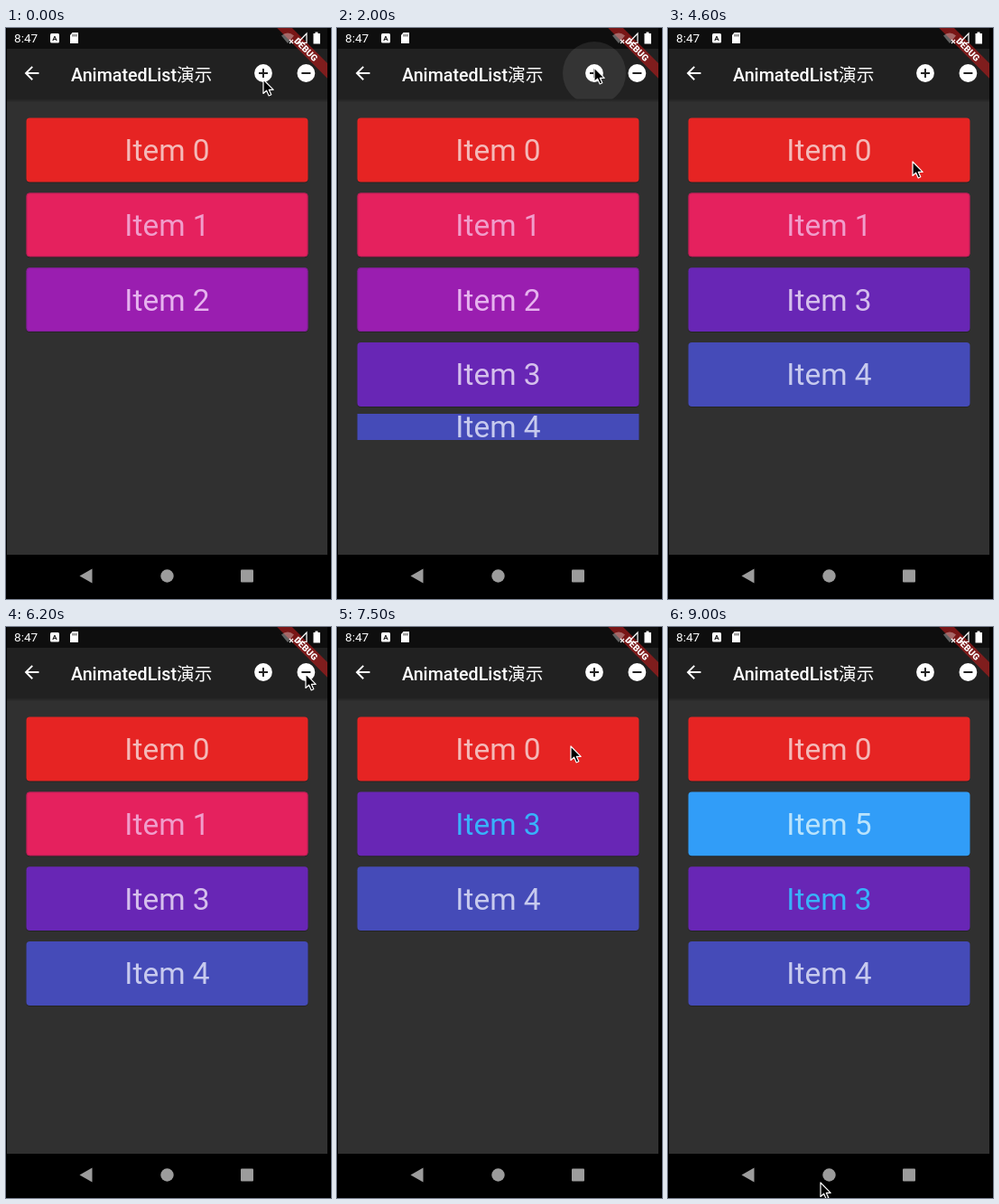
Recreate the animation shown at these times as an HTML page. Size 360 by 632 pixels, loop 9.1 s.

```html
<!DOCTYPE html>
<html lang="zh">
<head>
<meta charset="utf-8">
<title>List demo</title>
<style>
  html, body { margin: 0; width: 100%; height: 100%; overflow: hidden; background: #000; }
  svg { display: block; }
  text { font-family: Roboto, "Noto Sans CJK SC", "Noto Sans CJK", sans-serif; }
</style>
</head>
<body>
<svg id="stage" width="360" height="632" viewBox="0 0 360 632">
  <defs>
    <clipPath id="barClip"><rect x="1" y="0" width="355" height="78.5"/></clipPath>
    <clipPath id="screenClip"><rect x="1" y="0" width="355" height="632"/></clipPath>
    <linearGradient id="barShadow" x2="0" y2="1">
      <stop stop-color="#000" stop-opacity=".3"/>
      <stop offset="1" stop-color="#000" stop-opacity="0"/>
    </linearGradient>
  </defs>

  <rect width="360" height="632" fill="#000"/>
  <rect x="1" y="78" width="355" height="505" fill="#303030"/>
  <g id="list"></g>

  <rect x="1" y="0" width="355" height="78.5" fill="#212121"/>
  <rect x="1" y="78.5" width="355" height="4" fill="url(#barShadow)"/>
  <rect x="1" y="0" width="355" height="23" fill="#0e0e0e"/>
  <g id="splashes" clip-path="url(#barClip)" fill="#fff"></g>

  <path transform="translate(16.7 38.2) scale(.986)" fill="#fff"
    d="M20 11H7.83l5.59-5.59L12 4l-8 8 8 8 1.41-1.41L7.83 13H20z"/>
  <text x="72" y="58.5" font-size="19.7" font-weight="500" fill="#fff">AnimatedList演示</text>
  <g fill="#fff">
    <circle cx="285" cy="50" r="9.9"/>
    <circle cx="332.4" cy="50" r="9.9"/>
  </g>
  <path d="M280 50h10M285 45v10M327.4 50h10" stroke="#212121" stroke-width="2"/>

  <g clip-path="url(#screenClip)">
    <g transform="translate(356 0) rotate(45)">
      <rect x="-40" y="27.6" width="80" height="11.8" fill="#b71c1c" fill-opacity=".63"/>
      <text x="0" y="37.1" font-size="10" font-weight="900" fill="#fff" text-anchor="middle">DEBUG</text>
    </g>
  </g>

  <text x="9" y="16" font-size="13.6" fill="#fff">8:47</text>
  <rect x="49" y="6" width="10" height="10.5" rx="1.5" fill="#fff"/>
  <text x="54" y="14.2" font-size="8" font-weight="700" text-anchor="middle" fill="#111">A</text>
  <path d="M73.500 5H80V17H71V8Z" fill="#fff"/>
  <path d="M74 7v2.500M76 7v2.500M78 7v2.500" stroke="#111" stroke-width=".8"/>
  <path d="M305 8.500Q312 2.500 319 8.500L312 17Z" fill="#fff" fill-opacity=".35"/>
  <path d="M314 13l4 4M318 13l-4 4" stroke="#fff" stroke-width="1.200"/>
  <path d="M323 16.500H333V6Z" fill="none" stroke="#fff" stroke-width="1.200"/>
  <path d="M340.500 6H342.500V4.500H345.500V6H348V17.500H340.500Z" fill="#fff"/>

  <rect x="0" y="583" width="360" height="49" fill="#000"/>
  <g fill="#9c9c9c">
    <path d="M81.500 606.500L95.500 598.500V614.500Z"/>
    <circle cx="178.500" cy="606.500" r="7.200"/>
    <rect x="260" y="599.500" width="14" height="14" rx="1"/>
  </g>

  <path id="cursor" fill="#000" stroke="#fff" stroke-width="1.200" stroke-linejoin="round"
    d="M0 0V15.500L3.600 12.200L6.200 18L8.800 16.800L6.300 11.300H11.200Z"/>
</svg>
<script>
const LOOP = 9100, RESIZE = 300;
const LIST_TOP = 95.7, ROW = 78.9, PITCH = 82.8, MARGIN = 3.9;
const PLUS = 285, MINUS = 332.4;

// Listed in display order; times are in milliseconds.
const items = [
  { label: 0, fill: '#e62423', ink: '#f4b9b8' },
  { label: 1, fill: '#e5215e', ink: '#f09dcb', edge: '#a51c55', removed: 6300 },
  { label: 2, fill: '#9a1eb0', ink: '#e6b3ee', edge: '#74208c', selected: 2900, pick: '#409ffa', removed: 3950 },
  { label: 5, fill: '#319df8', ink: '#b9e3fc', added: 8060 },
  { label: 3, fill: '#6826b5', ink: '#d5bfec', added: 1250, selected: 7100, pick: '#38b2fa' },
  { label: 4, fill: '#454bb8', ink: '#c7caee', added: 1890 }
];

const taps = [[PLUS, 1250], [PLUS, 1890], [MINUS, 3950], [MINUS, 6300], [PLUS, 8060]];

// Pointer stops: time, x, y.
const pointer = [
  [0, 285, 57], [500, 285, 57], [1000, 285, 44], [2200, 285, 44],
  [2750, 262, 296], [3050, 262, 296], [3650, 336, 48], [4150, 336, 48],
  [4600, 271, 148], [4900, 264, 212], [5300, 264, 212], [5900, 332, 52],
  [6500, 332, 52], [6950, 256, 214], [7200, 256, 214], [7500, 259, 132],
  [7850, 285, 48], [8300, 285, 48], [9000, 169, 615], [9100, 169, 615]
];

const clamp = v => Math.max(0, Math.min(1, v));
const smooth = v => v * v * (3 - 2 * v);

function make(parent, tag, attrs) {
  const node = document.createElementNS('http://www.w3.org/2000/svg', tag);
  set(node, attrs);
  return parent.appendChild(node);
}

function set(node, attrs) {
  for (const key in attrs) node.setAttribute(key, attrs[key]);
}

const list = document.getElementById('list');
const cursor = document.getElementById('cursor');

for (const item of items) {
  item.row = make(list, 'svg', { x: 0, width: 356, overflow: 'hidden' });
  item.card = make(item.row, 'g', {});
  const box = { x: 22.5, width: 312, height: 70.9, rx: 4 };
  make(item.card, 'rect', { ...box, y: MARGIN + 1, fill: '#000', 'fill-opacity': .25 });
  make(item.card, 'rect', { ...box, y: MARGIN, fill: item.fill });
  if (item.edge) {
    make(item.card, 'rect', {
      x: 23, y: MARGIN + .5, width: 311, height: 69.9, rx: 3.5,
      fill: 'none', stroke: item.edge, 'stroke-opacity': .65
    });
  }
  item.text = make(item.card, 'text', {
    x: 178.5, y: MARGIN + 47.5, 'font-size': 33.5, 'text-anchor': 'middle'
  });
  item.text.textContent = 'Item ' + item.label;
}

const splashes = taps.map(([x, time]) => ({
  time, node: make(document.getElementById('splashes'), 'circle', { cx: x, cy: 50 })
}));

function extent({ added = -LOOP, removed = 2 * LOOP }, t) {
  return Math.min(clamp((t - added) / RESIZE), 1 - clamp((t - removed) / RESIZE));
}

function drawList(t) {
  let y = LIST_TOP;
  for (const item of items) {
    const size = extent(item, t);
    item.row.style.display = size > 0 ? '' : 'none';
    if (size <= 0) continue;
    const height = ROW * size;
    set(item.row, { y, height });
    set(item.card, { transform: `translate(0 ${(height - ROW) / 2})` });
    const picked = t >= item.selected && !(t >= item.removed);
    set(item.text, { fill: picked ? item.pick : item.ink });
    y += height + PITCH - ROW;
  }
}

function drawSplashes(t) {
  for (const { time, node } of splashes) {
    const age = t - time;
    set(node, {
      r: 35 * smooth(clamp((age + 50) / 150)),
      opacity: .085 * (1 - clamp((age - 150) / 250))
    });
  }
}

function drawCursor(t) {
  const next = pointer.findIndex(stop => stop[0] > t);
  const [t0, x0, y0] = pointer[next - 1], [t1, x1, y1] = pointer[next];
  const k = smooth((t - t0) / (t1 - t0));
  set(cursor, { transform: `translate(${x0 + (x1 - x0) * k} ${y0 + (y1 - y0) * k})` });
}

function render(t) {
  drawList(t);
  drawSplashes(t);
  drawCursor(t);
}

const start = performance.now();
function tick() {
  render((performance.now() - start) % LOOP);
  requestAnimationFrame(tick);
}
tick();
</script>
</body>
</html>
```
